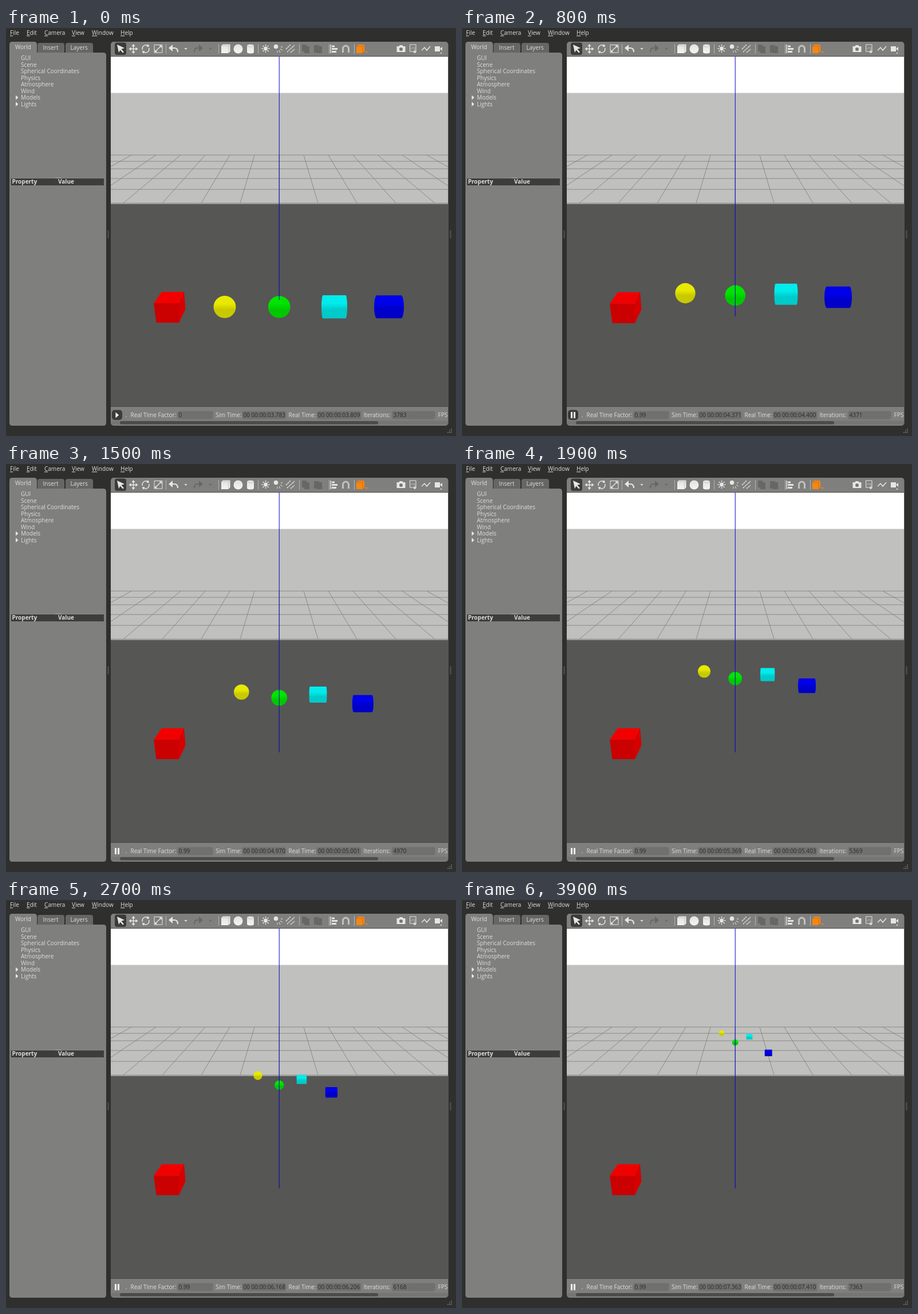
Animation, 786 px wide and 713 px high, one loop 4000 ms. Source, as an HTML page:

```html
<!DOCTYPE html>
<html lang="en">
<head>
<meta charset="utf-8">
<title>Physics simulator</title>
<style>
html, body { margin: 0; width: 100%; height: 100%; overflow: hidden; background: #2f2f2e; }
svg { display: block; width: 786px; height: 713px; }
text { font: 10px "Open Sans", "Noto Sans", sans-serif; fill: #dededc; white-space: pre; }
.bold { font-weight: 700; }
.value { fill: #2a2a29; }
.u { text-decoration: underline; }
.panel { fill: #7f7f7d; }
.tab { fill: #666664; }
.field { fill: #70706e; }
.sep { stroke: #b4b4b2; stroke-width: 1; }
.line { fill: none; stroke: #e6e6e4; stroke-width: 1.5; }
.solid { fill: #e6e6e4; }
.off { fill: #676765; }
</style>
</head>
<body>
<svg viewBox="0 0 786 713">
  <defs>
    <clipPath id="view"><rect x="183" y="49" width="589" height="612"/></clipPath>
    <linearGradient id="light" x2="0" y2="1">
      <stop stop-color="#e2e2e0"/><stop offset="1" stop-color="#f4f4f2"/>
    </linearGradient>
  </defs>

  <g id="menu"></g>

  <!-- left panel -->
  <path class="tab" d="M55 43V30q0-4 4-4H98q4 0 4 4V43zM104 43V30q0-4 4-4H148q4 0 4 4V43z"/>
  <path class="panel" d="M6 44V29q0-5 5-5H49q5 0 5 5V43H170q5 0 5 5V690q0 5-5 5H11q-5 0-5-5z"/>
  <text x="16" y="37">World</text>
  <text x="64.5" y="37.500">Insert</text>
  <text x="112.5" y="37.500">Layers</text>
  <g id="tree"></g>
  <path class="solid" d="M17 117.500l4.500 4-4.500 4zM17 129l4.500 4-4.500 4z"/>
  <path d="M86 262H98" stroke="#a4a4a2"/>
  <rect x="9" y="263" width="162" height="12" fill="#3d3d3c"/>
  <text class="bold" x="10.500" y="272.300">Property</text>
  <text class="bold" x="91" y="272.300">Value</text>
  <path d="M178.500 354V367M776.500 354V367" stroke="#777775" stroke-width="2" stroke-dasharray="1"/>

  <!-- main panel and toolbar -->
  <rect class="panel" x="183" y="24" width="589.500" height="671" rx="5"/>
  <path class="sep" d="M279.500 28V45M371.500 28V45M440.500 28V45M512.500 28V45M564.500 28V45M608.500 28V45"/>
  <rect x="190" y="25.500" width="20" height="21.500" rx="4" fill="#3b3b3a"/>
  <path class="solid" d="M194 29L207 35 201.500 37 206 42 204 43.500 199.500 38.500 197 43z"/>
  <g class="line">
    <path d="M222.500 31V42M217 36.500H228"/>
    <path d="M238.500 38a6 6 0 0 1 9-7M249.500 35a6 6 0 0 1-9 7"/>
    <path d="M259 29.500H273V43H259z" stroke-width="1"/><path d="M262 40L270 32"/>
    <path d="M290 35H294q6 0 6 7" stroke-width="2.200"/>
    <path d="M338 35H334q-5 0-5 7" stroke="#676765" stroke-width="2.200"/>
    <path d="M453.500 29V43M446.500 36H460.500M448.500 31L458.500 41M458.500 31L448.500 41" stroke-dasharray="2.500 9 2.500 0"/>
    <path d="M479 36.500L483 39M477 39L479 43M480 33H483M474 40V43" stroke-width="1"/>
    <path d="M489 37L497 29M491 42L504 30M497 43L504 37" stroke-dasharray="3 1"/>
    <path d="M567 29V44"/>
    <path d="M588.500 43V36a5 5 0 0 1 10 0V43" stroke="#c2c2c0" stroke-width="3"/>
    <path d="M726 39L731 34 735 39 741 32"/>
    <path d="M705.500 29H716V41H705.500z" stroke-width="1"/>
    <path d="M714 38V43M711.500 41L714 43.500 716.500 41" stroke-width="1.200"/>
  </g>
  <g class="solid">
    <path d="M222.500 28l3 4h-6zM222.500 45l3-4h-6zM214.500 36.500l4-3v6zM230.500 36.500l-4-3v6z"/>
    <path d="M248 28l2.500 4.500-5 .5zM240 45l-2.500-4.500 5-.5zM272 30.500v4.500l-4.500-4.500zM260 42.500v-4.500l4.500 4.500z"/>
    <path d="M284 35l7-6v12zM311.500 35h5l-2.500 3z"/>
    <circle cx="453.500" cy="36" r="3.400"/><circle cx="471.500" cy="32.500" r="3.800"/>
    <path d="M569 30.500h5v3h-5zM569 35h10v3h-10zM569 40h8v3h-8z"/>
    <path d="M682.500 32h4l1-2h5l1 2h4v10h-15z"/>
    <path d="M749 32h9v9h-9zM758 36l4-3v7zM758 43h4l-2 2z"/>
  </g>
  <circle cx="690" cy="37" r="3" fill="#777775"/>
  <text x="707" y="36.500" style="font-size:4.500px">LOG</text>
  <g fill="url(#light)">
    <path d="M376 31L379 28.500H391.500V41L388.500 44H376z"/>
    <circle cx="405.500" cy="36.500" r="8"/>
    <path d="M421 31q0-2.500 6-2.500t6 2.500V42q0 2.500-6 2.500t-6-2.500z"/>
  </g>
  <path d="M388.500 31V44M376 31H388.500L391.500 28.500M421 31q6 4 12 0" fill="none" stroke="#b8b8b6" stroke-width=".7"/>
  <path class="off" d="M344 35l-7-6v12zM354.500 35h5l-2.500 3zM517 29h8v12h-8zM521 32h9v12h-9zM538 30h9v13h-9zM543 32h9v12h-9z"/>
  <path d="M612 32L615 29H626V41L623 44H612z" fill="#f68712"/>
  <path d="M612 32H623V44M623 32L626 29" fill="none" stroke="#c56608" stroke-width=".8"/>
  <path d="M627 41h5l-2.500 3z" fill="#f68712"/>

  <!-- scene -->
  <g clip-path="url(#view)">
    <path fill="#fff" d="M183 49H772V114H183z"/>
    <path fill="#c0c0be" d="M183 113.500H772V308H183z"/>
    <path fill="#565655" d="M183 307.500H772V661H183z"/>
    <path id="grid" fill="none" stroke="#7b7b79" stroke-width=".8"/>
    <g id="cube">
      <path fill="#f20000" d="M272 461H311L302 481H258z"/>
      <path fill="#cb0000" d="M258 481H302V515H262.500z"/>
      <path fill="#d60000" d="M302 481L311 461 313.500 491 302 515z"/>
    </g>
    <g id="bodies"></g>
    <path id="axis" fill="none" stroke="#00c" stroke-opacity=".7" stroke-width="1.400"/>
  </g>
  <path d="M183 49.500H772M183 661.500H772" stroke="#484847"/>

  <!-- status bar -->
  <rect id="hover" x="185" y="667.500" width="18" height="17.500" rx="5" fill="#3b3b3a"/>
  <path id="play" fill="#fff" d="M191.500 671.500l5.500 5-5.500 5z"/>
  <path id="pause" fill="#f4f4f2" d="M190 671h3v11h-3zM195 671h3v11h-3z"/>
  <text x="208.500" y="680">.</text>
  <g id="status"></g>
  <rect x="184" y="686.500" width="588" height="6.500" rx="3" fill="#767674"/>
  <rect x="199" y="687" width="451" height="5.500" rx="2.700" fill="#4b4b4a"/>
  <path d="M778 700V708M775 703V708M772 706V708" stroke="#8a8a88" stroke-width="1.500" stroke-dasharray="1.500"/>
</svg>
<script>
const $ = id => document.getElementById(id);
const add = (parent, tag, attrs, text = '') => {
  const el = document.createElementNS('http://www.w3.org/2000/svg', tag);
  for (const k in attrs) el.setAttribute(k, attrs[k]);
  el.textContent = text;
  return parent.appendChild(el);
};

// Static labels
Object.entries({ File: 7, Edit: 36, Camera: 67, View: 115, Window: 150, Help: 200 }).forEach(([name, x]) => {
  const item = add($('menu'), 'text', { x, y: 12.3 });
  add(item, 'tspan', { class: 'u' }, name[0]);
  add(item, 'tspan', {}, name.slice(1));
});
['GUI', 'Scene', 'Spherical Coordinates', 'Physics', 'Atmosphere', 'Wind', 'Models', 'Lights']
  .forEach((name, i) => add($('tree'), 'text', { x: 26, y: 56.2 + i * 11.5 }, name));

const field = (label, x, fx, w) => {
  add($('status'), 'text', { x, y: 680 }, label);
  add($('status'), 'rect', { class: 'field', x: fx, y: 669.5, width: w, height: 14, rx: 2 });
  return add($('status'), 'text', { class: 'value', x: fx + 2, y: 680 });
};
const factor = field('Real Time Factor:', 217.5, 299.5, 62);
const simTime = field('Sim Time:', 366, 412.5, 76);
const realTime = field('Real Time:', 493.5, 543, 77);
const steps = field('Iterations:', 624.5, 674.5, 75);
add($('status'), 'text', { x: 754.5, y: 680 }, 'FPS');

// Ground grid in perspective
let grid = [222, 233, 246, 263, 282, 306].map(y => `M183 ${y}H772`).join('');
for (let k = -6; k <= 6; k++) grid += `M${477 + 43 * k} 222L${477 + 68 * k} 306`;
$('grid').setAttribute('d', grid);

// Clock: loop ms, simulated ms, real ms
const clock = [
  [100, 3783, 3809], [700, 4320, 4349], [800, 4371, 4400], [1300, 4771, 4801], [1500, 4970, 5001],
  [1900, 5369, 5403], [2300, 5769, 5804], [3100, 6566, 6607], [3900, 7363, 7410]
];
function clockAt(t, col) {
  if (t <= clock[0][0]) return clock[0][col];
  const i = Math.max(1, clock.findIndex(c => c[0] >= t));
  const a = clock[i - 1], b = clock[i];
  return Math.round(a[col] + (b[col] - a[col]) * (t - a[0]) / (b[0] - a[0]));
}
const stamp = ms => '00 00:00:' + (ms / 1000).toFixed(3).padStart(6, '0');

// Pose tracks over simulated seconds, starting at rest
const knots = [0, .588, 1.187, 1.586, 1.986, 2.783, 3.58];
function spline(v, s) {
  const last = v.length - 1;
  const slope = j => {
    if (!j) return 0;
    const n = Math.min(j + 1, last);
    return (v[n] - v[j - 1]) / (knots[n] - knots[j - 1]);
  };
  let i = 0;
  while (i < last - 1 && s > knots[i + 1]) i++;
  const h = knots[i + 1] - knots[i], u = (s - knots[i]) / h, u2 = u * u, u3 = u2 * u;
  return v[i] * (2 * u3 - 3 * u2 + 1) + v[i + 1] * (3 * u2 - 2 * u3)
    + h * (slope(i) * (u3 - 2 * u2 + u) + slope(i + 1) * (u3 - u2));
}

const ball = (x, y, w) => {
  const r = w / 2;
  return `M${x - r} ${y}a${r} ${r} 0 1 1 ${w} 0a${r} ${r} 0 1 1 ${-w} 0z`;
};
const drum = (ratio, bulge) => (x, y, w) => {
  const h = w * ratio(w), b = w * w * bulge, half = w / 2 - b;
  return `M${x - half} ${y - h / 2}H${x + half}a${b} ${h / 2} 0 0 1 0 ${h}H${x - half}a${b} ${h / 2} 0 0 1 0 ${-h}z`;
};

const bodies = [
  { top: '#e9e900', low: '#c9c900', shape: ball,
    x: [382, 390, 411.3, 423, 432.3, 446.3, 453.5],
    y: [487.5, 463.5, 398.5, 362.5, 333.3, 281.5, 232.7],
    w: [39, 35.4, 26.6, 22, 18.4, 12.6, 9.8] },
  { top: '#00e400', low: '#00c800', shape: ball,
    x: knots.map(() => 477.2),
    y: [487.5, 467.5, 408.7, 375, 346.2, 301, 249],
    w: [38.6, 35.8, 27.8, 23.6, 19.6, 14, 10.8] },
  { top: '#00ecec', low: '#00caca', shape: drum(() => .9, .0013),
    x: [573.5, 566, 545, 533.7, 524, 510, 502],
    y: [487.3, 465.2, 403, 368, 338.5, 289.5, 239],
    w: [45, 41, 31, 25.3, 21, 14.8, 10.8] },
  { top: '#0000ea', low: '#0000c8', shape: drum(w => .915 - .0028 * w, .0018),
    x: [669, 657, 623.3, 602.5, 584.3, 554.3, 535.2],
    y: [487.3, 470.5, 418.8, 387.5, 359.3, 313.7, 267.3],
    w: [52, 48, 37, 31, 26, 17.5, 13] }
];
bodies.forEach((b, i) => {
  const g = add(document.querySelector('defs'), 'linearGradient', { id: 'shade' + i, x2: 0, y2: 1 });
  [[0, b.top], [.35, b.top], [.62, b.low], [1, b.low]]
    .forEach(([offset, color]) => add(g, 'stop', { offset, 'stop-color': color }));
  b.el = add($('bodies'), 'path', { fill: `url(#shade${i})` });
});

function draw(t) {
  const sim = clockAt(t, 1), s = (sim - 3783) / 1000, running = t >= 200;
  for (const b of bodies) b.el.setAttribute('d', b.shape(spline(b.x, s), spline(b.y, s), spline(b.w, s)));

  // The green ball hides the part of the axis that is still inside it
  const hid = 14.5 * Math.sqrt(Math.max(0, 1 - (8.6 * s * s) ** 2));
  $('axis').setAttribute('d', `M477.300 49V${489.5 - hid}M477.300 ${489.5 + hid}V504`);
  $('cube').setAttribute('transform', `translate(0 ${running ? .8 : 0})`);

  $('play').style.display = running ? 'none' : '';
  $('pause').style.display = running ? '' : 'none';
  $('hover').style.display = t < 1000 ? '' : 'none';
  factor.textContent = t < 300 ? '0' : t >= 2200 && t < 2600 ? '1.00' : '0.99';
  simTime.textContent = stamp(sim);
  realTime.textContent = stamp(clockAt(t, 2));
  steps.textContent = sim;
}

let shown = -1;
function tick() {
  let t = Math.floor(performance.now() % 4000 / 100) * 100;
  if (t < 200) t = 0;
  if (t !== shown) draw(shown = t);
  requestAnimationFrame(tick);
}
tick();
</script>
</body>
</html>
```
